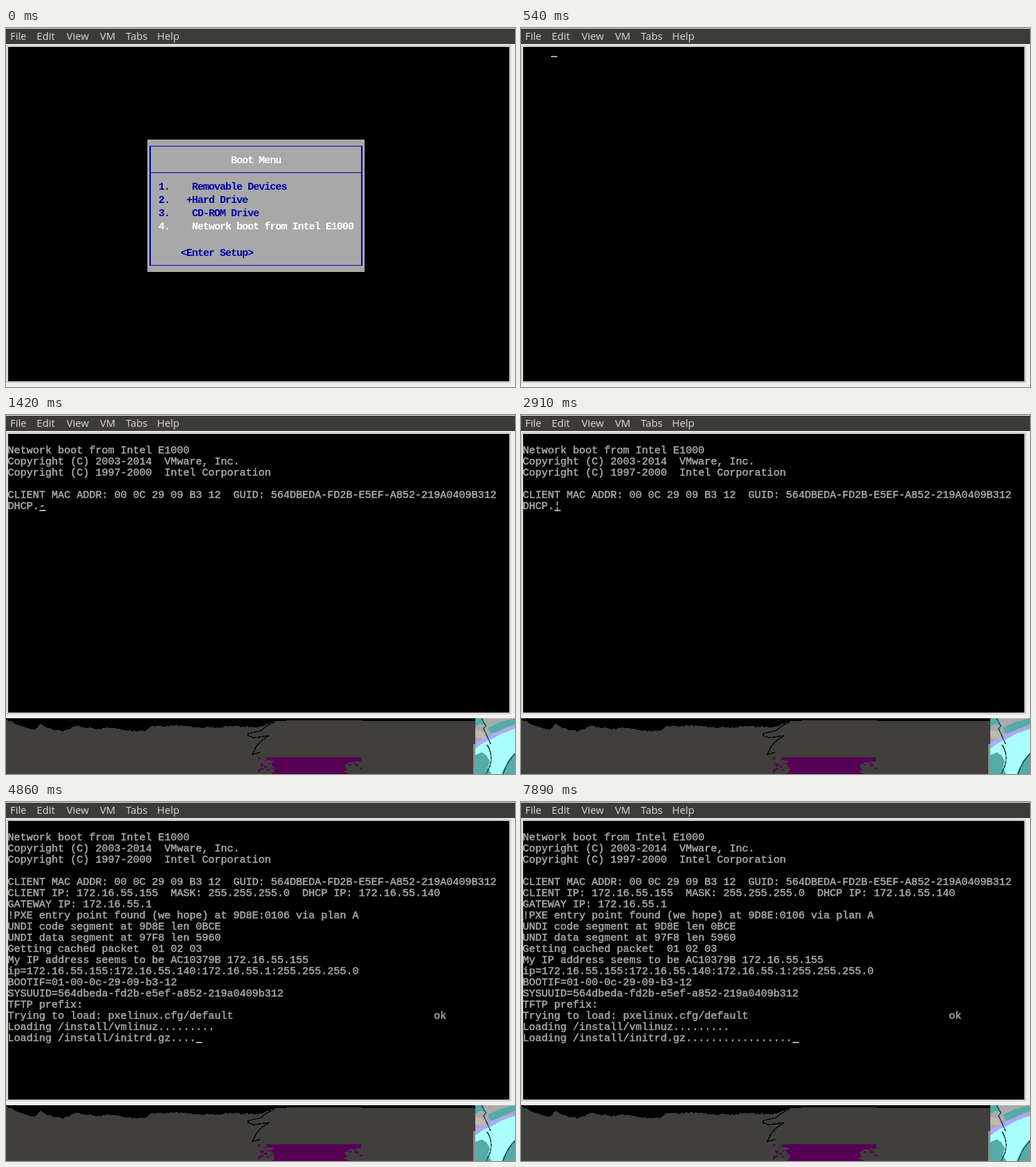
These frames come from a looping animation (731x515 px, 8 s). An HTML page:

```html
<!DOCTYPE html>
<html lang="en">
<head>
<meta charset="utf-8">
<title>Network boot</title>
<style>
  html, body { margin: 0; width: 100%; height: 100%; overflow: hidden; background: #f2f1f0; }
  svg { display: block; width: 731px; height: 515px; }
  text { white-space: pre; }
  rect, .crisp { shape-rendering: crispEdges; }
  .bar text { font: 14.8px "Open Sans", "Noto Sans", sans-serif; fill: #dfdbd2; }
  .menu text { font: bold 15px "Liberation Mono", monospace; letter-spacing: -1px; fill: #0000a8; }
  .menu .on { fill: #fff; }
  .tty text { font: 15px "Liberation Mono", monospace; fill: #a8a8a8; stroke: #a8a8a8; stroke-width: .5; }
  .tty rect { fill: #a8a8a8; }
</style>
</head>
<body>
<svg id="stage" viewBox="0 0 731 515">
  <defs>
    <clipPath id="cut"><rect id="cutBox" x="203" y="160" width="312" height="190"/></clipPath>
    <clipPath id="art"><rect x="674" y="435" width="57" height="80"/></clipPath>
  </defs>

  <rect width="731" height="515" fill="#f2f1f0"/>
  <g class="bar" id="bar">
    <rect y="1" width="731" height="22" fill="#3c3b37"/>
  </g>

  <rect id="frame" x="1.5" y="25.5" width="723" height="483" fill="#fff" stroke="#b2afaa"/>
  <rect id="screen" x="3" y="27" width="720" height="480"/>

  <g class="menu" id="menu" clip-path="url(#cut)">
    <rect x="203" y="160" width="312" height="190" fill="#a8a8a8"/>
    <g fill="#0000a8">
      <rect x="206" y="169" width="2" height="172"/>
      <rect x="510" y="169" width="2" height="172"/>
      <rect x="206" y="169" width="306" height="1"/>
      <rect x="206" y="207" width="306" height="1"/>
      <rect x="206" y="340" width="306" height="1"/>
    </g>
  </g>

  <g class="tty" id="tty">
    <rect id="cursor" width="9" height="2"/>
  </g>
  <rect id="oldCursor" x="43" y="40" width="9" height="2" fill="#a8a8a8"/>

  <g id="desk" class="crisp">
    <rect y="435" width="731" height="80"/>
    <path id="ground" fill="#403f3c"/>
    <path d="M386 440Q372 447 366 453L348 457V460L356 463L378 460Q362 469 358 478L354 487L365 484"
      fill="none" stroke="#000" stroke-width="1.4"/>
    <path d="M374 491H510V497L494 498L486 503L490 509L484 511L494 515H384L386 507L381 501L385 496L374 495Z" fill="#550055"/>
    <g id="specks" fill="#550055"></g>
    <rect x="671" y="472" width="3" height="43" fill="#8f8e8a"/>
    <g clip-path="url(#art)">
      <rect x="674" y="435" width="57" height="80" fill="#aaffff"/>
      <path d="M674 435H731V449Q712 454 698 461L686 470L674 478Z" fill="#aaaaaa"/>
      <path d="M692 449L708 441L731 435V443L714 450L697 458Z" fill="#55aaaa"/>
      <path d="M674 435H685L689 445L681 443L674 447Z" fill="#55aaaa"/>
      <path d="M674 452L684 454L690 462L683 465L674 462Z" fill="#c3b7aa"/>
      <path d="M674 470L688 463L700 456L731 446V450L712 457L697 465L684 471L674 477Z" fill="#aaaaff"/>
      <path d="M674 488L683 484L690 488L695 497L692 506L697 515H674Z" fill="#55aaaa"/>
      <path d="M731 484Q719 496 712 515H731Z" fill="#55aaaa"/>
      <path d="M683 435L689 446L686 450L696 472M691 473Q700 488 695 503L690 515M731 486Q719 498 714 515"
        fill="none" stroke="#16565a" stroke-width="1.6"/>
    </g>
  </g>
</svg>

<script>
const $ = id => document.getElementById(id);
const LOOP = 8000;

function add(parent, tag, attrs, text = "") {
  const el = document.createElementNS("http://www.w3.org/2000/svg", tag);
  for (const key in attrs) el.setAttribute(key, attrs[key]);
  el.textContent = text;
  return parent.appendChild(el);
}
const show = (id, on) => $(id).setAttribute("visibility", on ? "visible" : "hidden");

// Menu bar
[["File", 6], ["Edit", 44], ["View", 87], ["VM", 135], ["Tabs", 172], ["Help", 217]]
  .forEach(([label, x]) => add($("bar"), "text", { x, y: 17 }, label));

// Boot menu on a grid of 8 by 19
function item(col, row, text, on) {
  add($("menu"), "text", { x: 203 + col * 8, y: 175 + row * 19, class: on ? "on" : "" }, text);
}
item(15, 1, "Boot Menu", true);
item(2, 3, "1.    Removable Devices");
item(2, 4, "2.   +Hard Drive");
item(2, 5, "3.    CD-ROM Drive");
item(2, 6, "4.    Network boot from Intel E1000", true);
item(6, 8, "<Enter Setup>");

// Wallpaper with a ragged upper edge
let seed = 7;
const rnd = () => (seed = seed * 16807 % 2147483647) / 2147483647;
const edge = [[0, 437], [18, 445], [40, 452], [50, 443], [62, 450], [82, 453], [102, 446], [130, 451],
  [150, 448], [172, 453], [200, 453], [207, 447], [250, 446], [300, 449], [322, 446], [366, 448],
  [386, 439], [420, 438], [500, 438], [520, 439], [674, 439]];
let ground = "M0 515";
for (let i = 1; i < edge.length; i++) {
  const [x0, y0] = edge[i - 1], [x1, y1] = edge[i];
  for (let x = x0; x < x1; x += 3) {
    const y = y0 + (y1 - y0) * (x - x0) / (x1 - x0) + (x < 380 ? rnd() * 2 - 1 : 0);
    ground += `L${x} ${Math.round(y)}`;
  }
}
$("ground").setAttribute("d", ground + "L674 439V515Z");
for (let i = 0; i < 24; i++) {
  const left = i % 3;
  add($("specks"), "rect", {
    x: Math.round(left ? 360 + rnd() * 22 : 484 + rnd() * 24),
    y: Math.round(491 + rnd() * (left ? 22 : 16)),
    width: 1 + Math.round(rnd() * 4), height: 1 + Math.round(rnd() * 2)
  });
}

// Terminal
const intro = ["", "Network boot from Intel E1000",
  "Copyright (C) 2003-2014  VMware, Inc.",
  "Copyright (C) 1997-2000  Intel Corporation", ""];
const client = "CLIENT MAC ADDR: 00 0C 29 09 B3 12  GUID: 564DBEDA-FD2B-E5EF-A852-219A0409B312";
const boot = [
  "CLIENT IP: 172.16.55.155  MASK: 255.255.255.0  DHCP IP: 172.16.55.140",
  "GATEWAY IP: 172.16.55.1",
  "!PXE entry point found (we hope) at 9D8E:0106 via plan A",
  "UNDI code segment at 9D8E len 0BCE",
  "UNDI data segment at 97F8 len 5960",
  "Getting cached packet  01 02 03",
  "My IP address seems to be AC10379B 172.16.55.155",
  "ip=172.16.55.155:172.16.55.140:172.16.55.1:255.255.255.0",
  "BOOTIF=01-00-0c-29-09-b3-12",
  "SYSUUID=564dbeda-fd2b-e5ef-a852-219a0409b312",
  "TFTP prefix:",
  "Trying to load: pxelinux.cfg/default".padEnd(68) + "ok"];
const kernelTimes = [3190, 3190, 3400, 3620, 3840, 4120, 4280, 4430, 4580];
const initrdTimes = [4720, 4720, 4720, 4860, 5070, 5380, 5600, 5820, 6040,
  6320, 6550, 6780, 7010, 7240, 7420, 7650, 7890];
const rows = Array.from({ length: 20 }, (_, i) => add($("tty"), "text", { x: 2.5, y: 39 + i * 16 }));

const dots = (times, t) => ".".repeat(times.filter(at => t >= at).length);

function spinner(t) {
  let k = Math.floor((t - 1200) / 110);
  if (t >= 1420) k = 2;
  if (t >= 1500) k = 3 + Math.floor((t - 1500) / 104);
  if (t >= 2020) k = 8 + Math.floor((t - 2020) / 111.25);
  if (t >= 2910) k = t < 3040 ? 16 : 17;
  return "¦/-\\"[k % 4];
}

// Lines on screen; the cursor follows the last one
function linesAt(t) {
  if (t < 990) return intro;
  const head = [...intro, client];
  if (t < 3150) {
    return [...head, t < 1030 ? "" : t < 1090 ? "DHCP" : "DHCP."];
  }
  const out = [...head, ...boot];
  if (t < 3190) return [...out, ""];
  out.push("Loading /install/vmlinuz" + dots(kernelTimes, t));
  if (t >= 4720) out.push("Loading /install/initrd.gz" + dots(initrdTimes, t));
  return out;
}

function render(t) {
  const small = t >= 620;
  $("frame").setAttribute("height", small ? 403 : 483);
  $("screen").setAttribute("height", small ? 400 : 480);
  $("cutBox").setAttribute("y", t < 500 ? 160 : 255);
  show("menu", t < 540);
  show("oldCursor", t >= 540 && t < 620);
  show("desk", t >= 580);
  show("tty", t >= 580);
  if (t < 580) return;

  $("tty").setAttribute("transform", `translate(0 ${small ? 0 : 40})`);
  const lines = linesAt(t);
  const last = lines.length - 1;
  $("cursor").setAttribute("x", 3 + lines[last].length * 9);
  $("cursor").setAttribute("y", 40 + last * 16);
  rows.forEach((row, i) => {
    let text = lines[i] || "";
    if (i === last && t >= 1200 && t < 3150) text += spinner(t);
    if (row.textContent !== text) row.textContent = text;
  });
}

const start = performance.now();
function tick() {
  render((performance.now() - start) % LOOP);
  requestAnimationFrame(tick);
}
tick();
</script>
</body>
</html>
```
